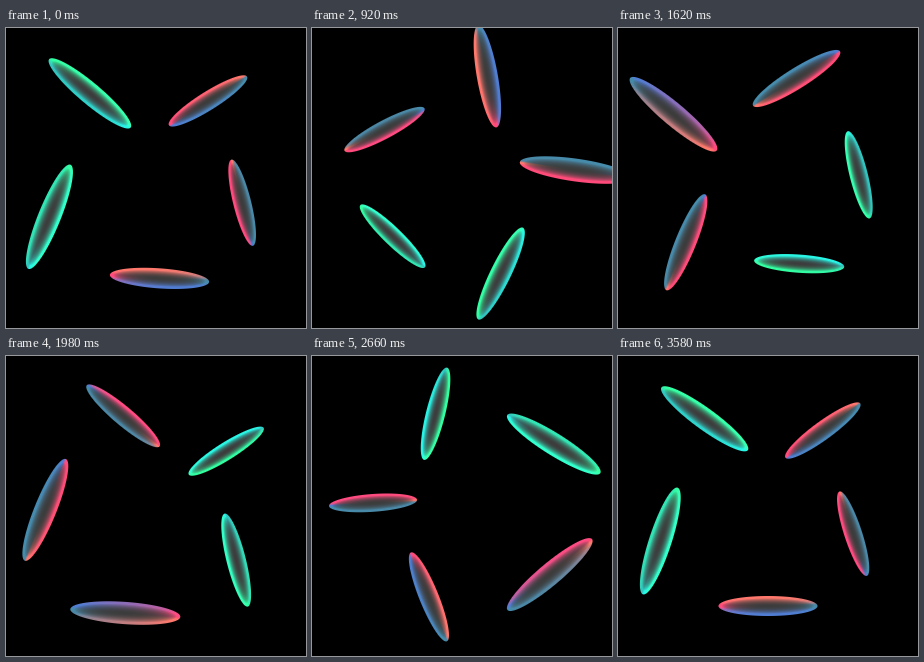
An HTML page with a canvas for the animation above (3.6 s loop, 300 by 300 pixels).

```html
<!DOCTYPE html>
<html lang="en">
<head>
<meta charset="utf-8">
<title>Orbiting ellipsoids</title>
<style>
  html, body { margin: 0; height: 100%; overflow: hidden; background: #000; }
  canvas { display: block; width: 300px; height: 300px; }
</style>
</head>
<body>
<canvas id="stage" width="300" height="300"></canvas>
<script>
const SIZE = 300, MID = SIZE / 2, STEP = 20, STEPS = 180, RAD = Math.PI / 180;
const ORBIT = 100, HALF_LENGTH = 49.5, HALF_WIDTH = 10, CORE = 60, RIM_GAIN = 1.9;

// Rim colours every 60 degrees around the light direction.
const RED = [[255, 75, 130], [255, 75, 120], [255, 120, 108], [75, 135, 165], [70, 140, 172], [80, 125, 210]];
const GREEN = [[50, 195, 190], [50, 230, 180], [50, 255, 160], [55, 255, 175], [50, 255, 205], [40, 245, 230]];
const FIRST_STOP = -90;

const ctx = document.getElementById('stage').getContext('2d');
const image = ctx.createImageData(SIZE, SIZE);
const pixels = image.data;

const smooth = t => t * t * (3 - 2 * t);

function drawEllipsoid(cx, cy, scale, spin, light, palette) {
  const a = HALF_LENGTH * scale, b = HALF_WIDTH * scale;
  const cos = Math.cos(spin), sin = Math.sin(spin);
  const reachX = Math.hypot(a * cos, b * sin) + 1, reachY = Math.hypot(a * sin, b * cos) + 1;
  const right = Math.min(SIZE - 1, cx + reachX), bottom = Math.min(SIZE - 1, cy + reachY);

  for (let y = Math.max(0, Math.floor(cy - reachY)); y <= bottom; y++) {
    for (let x = Math.max(0, Math.floor(cx - reachX)); x <= right; x++) {
      const dx = x + 0.5 - cx, dy = y + 0.5 - cy;
      const u = (dx * cos + dy * sin) / a, v = (dy * cos - dx * sin) / b;
      const q = Math.hypot(u, v) || 1e-6;
      const cover = Math.min(1, (1 - q) * q / Math.hypot(u / a, v / b) + 0.5);
      if (cover <= 0) continue;

      const w = Math.sqrt(Math.max(0, 1 - q * q));
      const facing = w / Math.hypot(u * 0.5, v, w);
      const rim = Math.min(1, RIM_GAIN * (1 - facing ** 1.5));

      const normal = Math.atan2(v / b, u / a) + spin;
      const turn = (((normal - light) / RAD - FIRST_STOP) / 60 % 6 + 6) % 6;
      const stop = Math.floor(turn), mix = smooth(turn - stop);
      const from = palette[stop % 6], to = palette[(stop + 1) % 6];

      const p = (y * SIZE + x) * 4;
      for (let c = 0; c < 3; c++) {
        const tint = from[c] + (to[c] - from[c]) * mix;
        pixels[p + c] = (CORE + (tint - CORE) * rim) * cover;
      }
    }
  }
}

function draw(step) {
  for (let p = 0; p < pixels.length; p += 4) {
    pixels[p] = pixels[p + 1] = pixels[p + 2] = 0;
    pixels[p + 3] = 255;
  }
  for (let i = 0; i < 5; i++) {
    const place = (270 + 72 * i + 2 * step) * RAD;
    const depth = Math.cos((90 + 72 * i - 2 * step) * RAD);
    const scale = 1 / (1 - 0.123 * depth);
    drawEllipsoid(
      MID + ORBIT * scale * Math.cos(place),
      MID - ORBIT * scale * Math.sin(place),
      scale,
      (72 * i + 4 * step) * RAD,
      (240 - 2 * step) * RAD,
      i < 3 ? RED : GREEN
    );
  }
  ctx.putImageData(image, 0, 0);
}

const start = performance.now();
function tick() {
  const elapsed = performance.now() - start;
  draw(Math.floor(elapsed / STEP) % STEPS + 1);
  requestAnimationFrame(tick);
}
tick();
</script>
</body>
</html>
```
